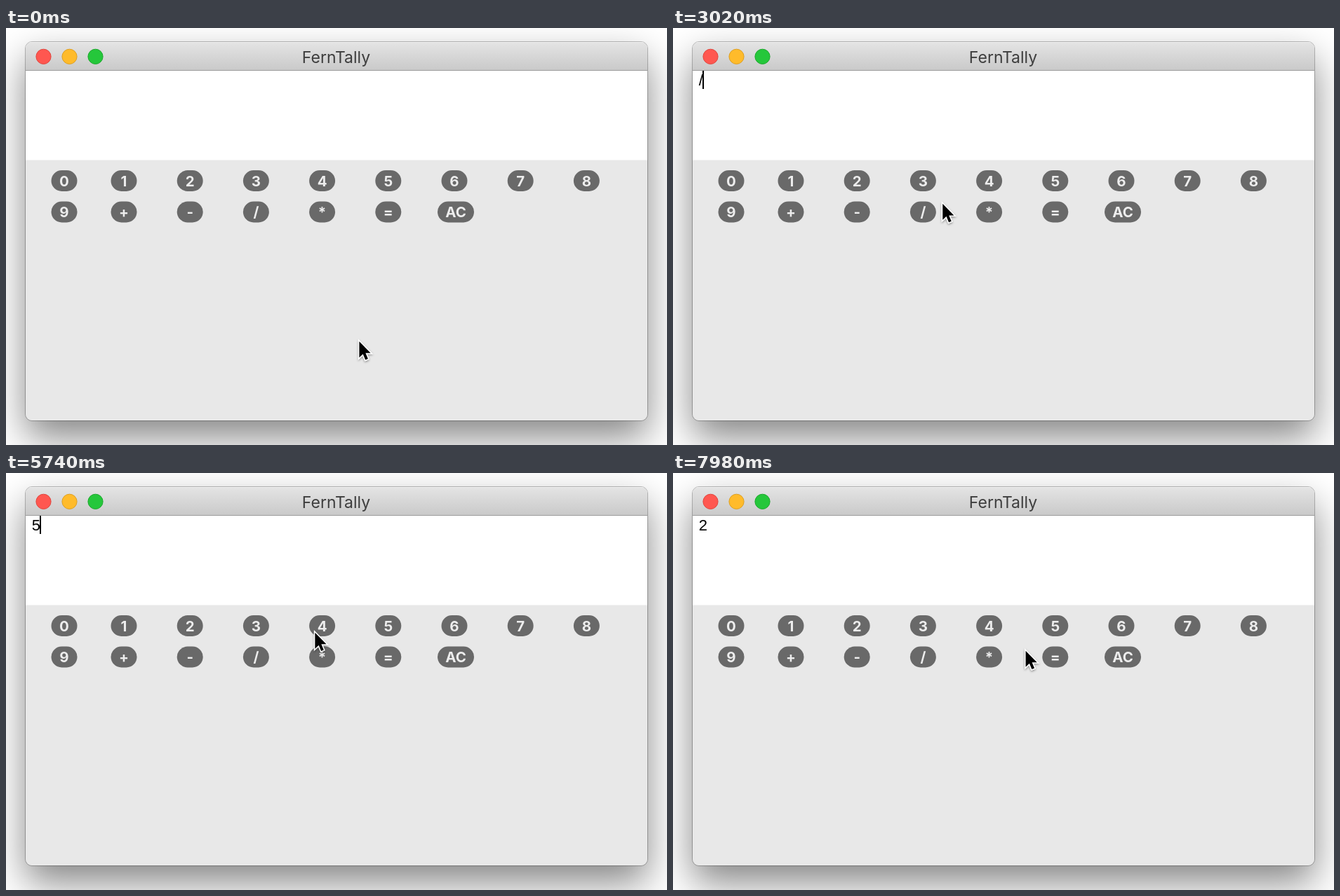
These frames come from a looping animation (942x595 px, 8 s). An HTML page:

```html
<!DOCTYPE html>
<html lang="en">
<head>
<meta charset="utf-8">
<title>FernTally</title>
<style>
  html, body { margin: 0; width: 100%; height: 100%; overflow: hidden; background: #fff; }
  svg { display: block; width: 100vw; height: 100vh; }
  .ui { font-family: Inter, "Liberation Sans", sans-serif; text-anchor: middle; }
  .title { font-size: 23px; fill: #3e3e3e; }
  .key { font-size: 20.5px; font-weight: 700; fill: #ededed; }
  .display { font: 22px "Liberation Sans", Arial, sans-serif; fill: #000; }
</style>
</head>
<body>
<svg viewBox="0 0 942 595" xmlns="http://www.w3.org/2000/svg">
  <defs>
    <linearGradient id="bar" x1="0" y1="0" x2="0" y2="1">
      <stop offset="0" stop-color="#e4e4e4"/>
      <stop offset="1" stop-color="#c9c9c9"/>
    </linearGradient>
    <clipPath id="frame"><rect x="28" y="20" width="886" height="540" rx="9"/></clipPath>
    <filter id="soft" filterUnits="userSpaceOnUse" x="-120" y="-120" width="1200" height="860">
      <feGaussianBlur stdDeviation="27"/>
    </filter>
    <filter id="lift" x="-40%" y="-40%" width="180%" height="180%">
      <feDropShadow dx="0" dy="1.5" stdDeviation="1.5" flood-opacity=".4"/>
    </filter>
  </defs>

  <rect width="942" height="595" fill="#fff"/>
  <rect x="28" y="44" width="886" height="540" rx="9" opacity=".48" filter="url(#soft)"/>
  <rect x="27.5" y="19.5" width="887" height="541" rx="9.5" fill="none" stroke="#000" stroke-opacity=".26"/>
  <g clip-path="url(#frame)">
    <rect x="28" y="20" width="886" height="540" fill="#e8e8e8"/>
    <rect x="28" y="20" width="886" height="41" fill="url(#bar)"/>
    <rect x="28" y="20" width="886" height="1" fill="#f1f1f1"/>
    <rect x="28" y="60" width="886" height="1" fill="#9c9c9c"/>
    <rect x="28" y="61" width="886" height="127.5" fill="#fff"/>
  </g>
  <g id="lights"></g>
  <text class="ui title" x="470.5" y="49.5">FernTally</text>
  <text class="display" id="entry" x="36.7" y="82"></text>
  <rect id="caret" y="61" width="2" height="26"/>
  <g id="keys" class="ui"></g>
  <g id="pointer" filter="url(#lift)">
    <path d="M1.4 3.2V26.2L6.7 21.2L10.2 29.6L13.9 28L10.4 19.8H17.6Z"
      stroke="#fff" stroke-width="3" stroke-miterlimit="3" paint-order="stroke"/>
  </g>
</svg>
<script>
const LOOP = 8000;
const BLINK = 500;
const HOLD = 120;   // how long a key stays down
const REST = 90;    // pause between release and the next move
const SHORT = 5;    // the pointer stops this far before a key's centre
const ARC = 0.035;  // upward bow of a move, relative to its length
const $ = id => document.getElementById(id);

function add(parent, tag, attrs, text) {
  const el = document.createElementNS("http://www.w3.org/2000/svg", tag);
  for (const name in attrs) el.setAttribute(name, attrs[name]);
  if (text) el.textContent = text;
  return parent.appendChild(el);
}

[["#ff5750", "#e0463e"], ["#ffbb2b", "#dd9f22"], ["#25c73b", "#1ca82c"]].forEach(([fill, stroke], i) =>
  add($("lights"), "circle", { cx: 53.5 + 37 * i, cy: 40.8, r: 10.6, fill, stroke }));

const keys = {};
[..."0123456789+-/*=", "AC"].forEach((label, i) => {
  const column = i % 9;
  const wide = label === "AC";
  const x = (column ? 73.8 + 94.2 * column : 83) + (wide ? 2 : 0);
  const y = i < 9 ? 218 : 262.5;
  const width = wide ? 52 : 37;
  const shape = add($("keys"), "rect", { x: x - width / 2, y: y - 15, width, height: 30, rx: 15 });
  add($("keys"), "text", { class: "key", x, y: y + 7.6 }, label);
  keys[label] = { x, y, shape };
});

// Each step: key, pointer arrival, press
const steps = [
  ["3", 1610, 1940], ["/", 2540, 2640], ["4", 3600, 3660], ["*", 4460, 4540],
  ["5", 5220, 5310], ["-", 6240, 6300], ["2", 7120, 7220], ["=", 8220, 8300]
];

const home = { x: 502, y: 444 };
let from = home, leave = 930;
const moves = steps.map(([label, arrive, down]) => {
  const key = keys[label];
  const to = { x: key.x - SHORT * Math.sign(key.x - from.x), y: key.y - 1 };
  const move = { label, from, to, leave, arrive, down, up: down + HOLD };
  from = to;
  leave = move.up + REST;
  return move;
});

// Quick start, soft landing
function ease(u) {
  const v = Math.pow(Math.min(1, Math.max(0, u)), 0.75);
  return v * v * (3 - 2 * v);
}

function pointerAt(t) {
  const { from, to, leave, arrive } = moves.findLast(m => t >= m.leave) ?? moves[0];
  const s = ease((t - leave) / (arrive - leave));
  const dx = to.x - from.x, dy = to.y - from.y;
  const bow = ARC * Math.hypot(dx, dy) * 4 * s * (1 - s);
  return [from.x + dx * s, from.y + dy * s - bow];
}

function render(t) {
  let text = "", since = 520;
  for (const { label, down, up } of moves) {
    const pressed = t >= down && t < up;
    keys[label].shape.setAttribute("fill", pressed ? "#3e3e3e" : "#696969");
    if (t >= up) [text, since] = [label, up];
  }
  const entry = $("entry");
  entry.textContent = text;
  $("caret").setAttribute("x", Math.floor(36.4 + entry.getComputedTextLength()));
  const lit = t >= since && (t - since) % (2 * BLINK) < BLINK;
  $("caret").setAttribute("visibility", lit ? "visible" : "hidden");
  $("pointer").setAttribute("transform", `translate(${pointerAt(t).join(" ")})`);
}

for (const { shape } of Object.values(keys)) shape.setAttribute("fill", "#696969");

const start = performance.now();
function tick() {
  render((performance.now() - start) % LOOP);
  requestAnimationFrame(tick);
}
tick();
</script>
</body>
</html>
```
